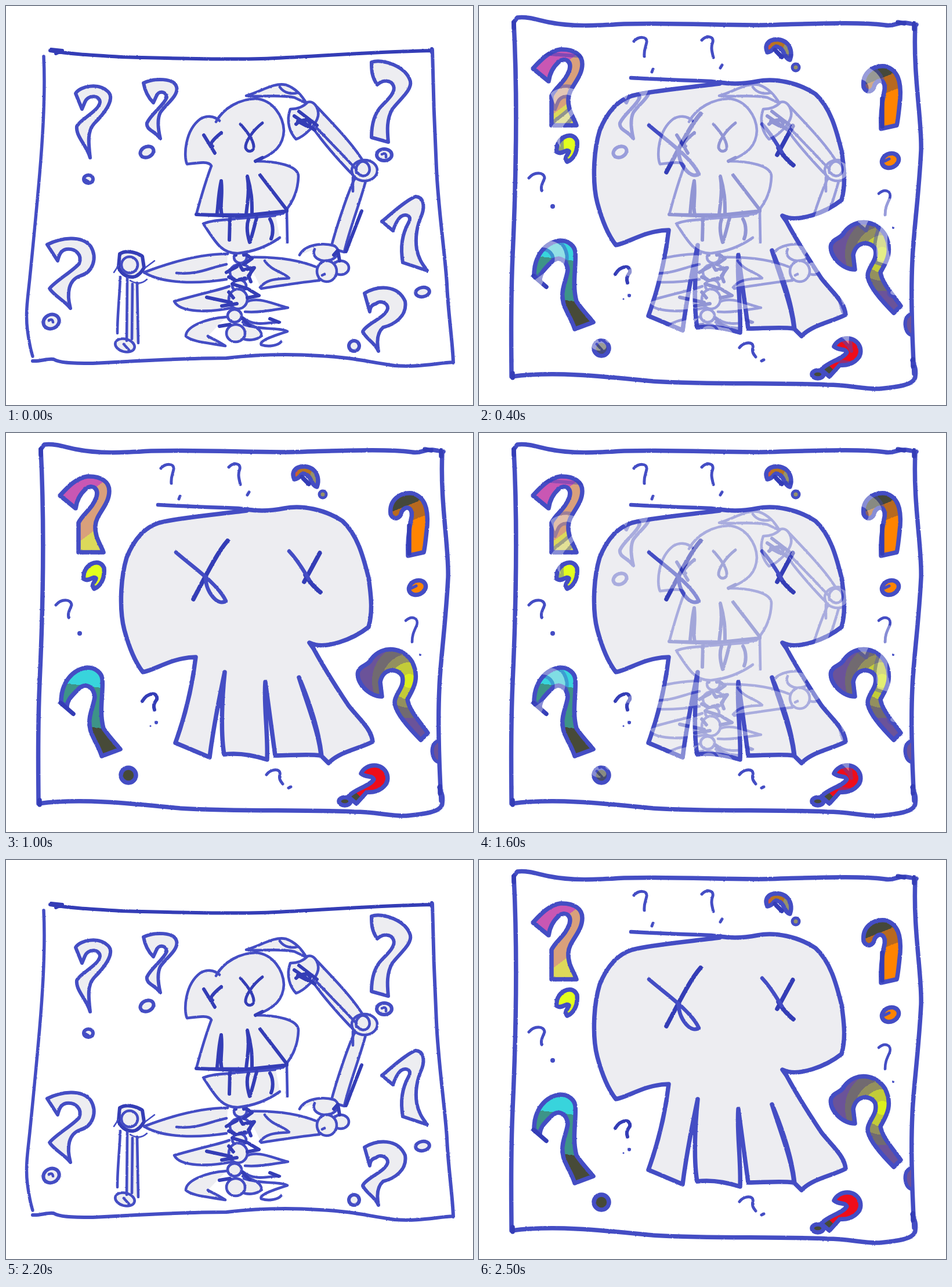
Write an HTML page without scripts that moves like this. It is 805 px wide and 689 px high and loops after 2.6 s.

```html
<!DOCTYPE html>
<html lang="en">
<head>
<meta charset="utf-8">
<title>Skull and skeleton</title>
<style>
html, body { margin: 0; width: 100%; height: 100%; overflow: hidden; background: #fff; }
svg { display: block; width: 100%; height: 100%; }
.ink { fill: none; stroke: #444dc4; stroke-width: 6; stroke-linecap: round; stroke-linejoin: round; }
.pale { fill: #ededf1; }
.dark { stroke: #343db6; }
.thin { stroke-width: 4.6; }
.bold { stroke-width: 7.5; }
.dot { fill: #444dc4; stroke: none; }
mask { mask-type: alpha; }

.bones, .skull, .skull-ghost, .bones-ghost { animation: 2600ms -10ms infinite; }
.bones { animation-name: bones; animation-timing-function: step-end; }
.skull { animation-name: skull; animation-timing-function: step-end; }
.skull-ghost { animation-name: skull-ghost; }
.bones-ghost { animation-name: bones-ghost; }

@keyframes bones {
  0%, 65.385%, 92.308% { opacity: 1; }
  15.385%, 88.462%, 96.154%, 100% { opacity: 0; }
}
@keyframes skull {
  0%, 65.385%, 92.308% { opacity: 0; }
  15.385%, 88.462%, 96.154%, 100% { opacity: 1; }
}
@keyframes skull-ghost {
  0% { opacity: 0; animation-timing-function: steps(8); }
  30.769% { opacity: 1; }
  46.154% { opacity: 1; animation-timing-function: steps(10); }
  84.615%, 100% { opacity: 0; }
}
@keyframes bones-ghost {
  0% { opacity: 1; animation-timing-function: steps(8); }
  30.769% { opacity: 0; }
  46.154% { opacity: 0; animation-timing-function: steps(10); }
  84.61% { opacity: 1; animation-timing-function: step-start; }
  84.62%, 100% { opacity: 0; }
}
</style>
</head>
<body>
<svg viewBox="0 0 805 689" preserveAspectRatio="none">
<defs>
  <filter id="rough" filterUnits="userSpaceOnUse" x="0" y="0" width="805" height="689" color-interpolation-filters="sRGB">
    <feTurbulence type="fractalNoise" baseFrequency=".25" numOctaves="2" seed="4"/>
    <feDisplacementMap in="SourceGraphic" scale="2" xChannelSelector="R" yChannelSelector="G"/>
  </filter>

  <linearGradient id="candy" gradientUnits="userSpaceOnUse" x1="60" y1="80" x2="180" y2="240">
    <stop offset=".34" stop-color="#c957b3"/><stop offset=".34" stop-color="#d9a07b"/>
    <stop offset=".63" stop-color="#d9a07b"/><stop offset=".63" stop-color="#dcd95a"/>
  </linearGradient>
  <linearGradient id="sea" gradientUnits="userSpaceOnUse" x1="130" y1="400" x2="110" y2="560">
    <stop offset=".22" stop-color="#38d4dc"/><stop offset=".22" stop-color="#3d9488"/>
    <stop offset=".65" stop-color="#3d9488"/><stop offset=".65" stop-color="#474a38"/>
  </linearGradient>
  <linearGradient id="amber" gradientUnits="userSpaceOnUse" x1="672" y1="110" x2="712" y2="210">
    <stop offset=".13" stop-color="#45483a"/><stop offset=".2" stop-color="#45483a"/>
    <stop offset=".2" stop-color="#b8691f"/><stop offset=".45" stop-color="#b8691f"/>
    <stop offset=".45" stop-color="#ff8400"/>
  </linearGradient>
  <linearGradient id="rust" gradientUnits="userSpaceOnUse" x1="496" y1="60" x2="540" y2="78">
    <stop offset=".2" stop-color="#d0583c"/><stop offset=".2" stop-color="#b8741f"/>
    <stop offset=".65" stop-color="#b8741f"/><stop offset=".65" stop-color="#96926a"/>
  </linearGradient>
  <linearGradient id="ember" gradientUnits="userSpaceOnUse" x1="590" y1="640" x2="640" y2="590">
    <stop offset=".33" stop-color="#474a38"/><stop offset=".33" stop-color="#ee0d1a"/>
  </linearGradient>
  <radialGradient id="plum" gradientUnits="userSpaceOnUse" cx="695" cy="428" r="80">
    <stop offset=".15" stop-color="#dcf01e"/><stop offset=".15" stop-color="#c3cc38"/>
    <stop offset=".4" stop-color="#c3cc38"/><stop offset=".4" stop-color="#93905e"/>
    <stop offset=".58" stop-color="#93905e"/><stop offset=".58" stop-color="#716a70"/>
    <stop offset=".8" stop-color="#716a70"/><stop offset=".8" stop-color="#6b5399"/>
  </radialGradient>

  <g id="a" class="ink" filter="url(#rough)">
    <!-- border -->
    <path stroke-width="5.5" d="M65 87C68 150 64 220 58 290S44 440 41 470S33 530 37 560S43 595 46 605"/>
    <path class="dark" d="M76 77C110 83 150 85 200 88C300 91 400 92 440 91C530 88 600 80 735 77M78 75L97 77L86 82M734 74V80"/>
    <path d="M735 76C736 130 738 200 742 280C745 350 757 430 760 480C762 530 770 580 771 616M46 613C60 614 72 608 82 610C92 616 110 617 150 617C220 613 330 608 380 608C430 602 480 600 540 604C600 607 620 614 670 621C710 624 740 617 771 615"/>

    <!-- question marks -->
    <g class="pale">
      <path d="M120 151C128 138 160 132 176 148C190 162 165 190 152 203C140 216 142 235 145 262C140 242 120 225 122 208C128 195 160 182 162 166C162 154 142 152 136 166L131 178Z"/>
      <path d="M237 133C255 124 290 124 294 140C298 155 275 170 266 184C260 196 262 212 266 229C256 215 241 214 243 202C250 186 272 172 277 158C276 146 262 146 259 156L254 167C247 160 240 150 237 133Z"/>
      <path d="M630 97C650 90 690 105 697 130C700 145 680 160 666 178C656 195 657 215 659 235L630 227C630 205 635 185 648 172C660 160 672 148 668 138C664 128 650 126 640 136C630 122 630 110 630 97Z"/>
      <path d="M648 372C665 358 690 335 706 329C720 330 722 345 717 360C708 380 705 400 708 420C712 440 720 448 726 457L684 443C680 420 682 395 694 374C700 362 690 358 680 364C672 372 670 380 667 388Z"/>
      <path d="M71 412C95 400 130 395 146 415C158 435 150 460 128 466C108 473 104 495 111 522C100 508 85 502 75 488C85 475 115 458 126 445C132 430 120 418 104 420C95 422 92 428 89 440Z"/>
      <path d="M618 496C640 483 675 480 688 510C692 535 670 550 650 555C642 562 638 575 642 596C635 580 620 575 615 562C622 548 655 538 658 522C658 512 645 508 638 514C630 516 628 520 627 528Z"/>
      <ellipse cx="142" cy="299" rx="8" ry="7"/>
      <ellipse cx="243" cy="252" rx="12" ry="9" transform="rotate(-25 243 252)"/>
      <ellipse cx="652" cy="257" rx="13" ry="10"/>
      <ellipse cx="718" cy="494" rx="12" ry="8" transform="rotate(-10 718 494)"/>
      <ellipse cx="78" cy="545" rx="14" ry="12" transform="rotate(-25 78 545)"/>
      <circle cx="600" cy="587" r="9"/>
    </g>
    <path class="thin" d="M648 256Q656 252 655 261M74 543Q80 539 81 546M137 300L142 303"/>

    <!-- arms -->
    <g class="pale thin">
      <path d="M414 155C440 148 460 132 482 136C500 142 510 155 518 168L497 158C470 152 440 158 414 155Z"/>
      <path d="M536 174C565 205 600 240 618 272L600 294C575 268 550 240 530 212Z"/>
      <path d="M490 178C482 200 490 220 500 230C515 225 535 205 538 190C540 175 530 163 520 166C512 175 500 178 490 178Z"/>
      <path d="M602 296C590 320 570 380 560 418L583 425C592 385 612 335 620 302"/>
      <ellipse cx="618" cy="284" rx="22" ry="18"/>
      <path d="M506 430C515 412 545 408 566 414C580 424 570 440 548 440C532 438 528 428 532 420"/>
      <ellipse cx="577" cy="452" rx="14" ry="12"/>
      <path d="M208 470L208 580L228 582L226 476Z" stroke="none"/>
      <path d="M382 428C340 428 290 440 238 460C270 480 330 480 380 472"/>
      <path d="M414 434C470 432 510 440 538 452L540 474C500 478 460 485 440 488"/>
      <ellipse cx="553" cy="458" rx="17" ry="18"/>
      <path class="dark" stroke-width="6" d="M196 428C208 420 225 426 235 432L238 452C232 462 226 468 218 468C206 468 196 460 194 450Z"/>
      <circle cx="213" cy="447" r="14"/>
      <ellipse cx="205" cy="586" rx="17" ry="11" transform="rotate(15 205 586)"/>
    </g>
    <path class="thin" d="M472 140C480 152 495 152 502 150M535 210L604 282M598 296L598 320M604 288C600 270 618 262 625 275C632 290 616 300 606 288M545 465L549 463M192 565C192 530 196 500 197 468M209 470L208 578M218 480L217 575M226 478L228 582M203 584L212 594M294 461C330 465 350 452 380 446M446 440C458 458 480 460 488 470C470 472 450 470 438 486"/>
    <path stroke-width="2.5" d="M186 460L194 448M240 452L256 440M214 474Q230 484 243 472"/>
    <path class="dark" d="M613 354L586 424M497 190L532 214M500 204C515 190 532 200 520 208L503 199M505 182L536 206M565 430L572 422L575 440"/>

    <!-- ribs and spine -->
    <g class="pale thin">
      <path d="M385 484C370 490 330 498 290 510C300 530 350 530 395 520"/>
      <path d="M412 512C435 500 460 515 486 521C460 525 435 530 412 528"/>
      <path d="M380 537C340 540 310 555 310 570C320 580 350 582 378 587C365 578 350 572 348 570"/>
      <path d="M408 546C430 552 442 560 440 570C430 578 415 578 408 574"/>
      <ellipse cx="404" cy="434" rx="11" ry="10"/>
      <ellipse cx="404" cy="460" rx="18" ry="14"/>
      <ellipse cx="402" cy="483" rx="12" ry="10"/>
      <ellipse cx="400" cy="506" rx="16" ry="17"/>
      <ellipse cx="394" cy="535" rx="12" ry="11"/>
      <ellipse cx="396" cy="565" rx="16" ry="15"/>
    </g>
    <path class="thin" d="M408 538C430 556 455 545 472 546M410 550C440 560 475 555 485 562C460 570 436 578 440 585C455 590 470 585 474 580"/>
    <path class="dark" d="M396 420V430M410 420V430M412 428L424 436L410 446M380 460C392 452 398 452 402 446L408 456L428 452L418 466L422 476M384 468L396 474L412 470M390 480L416 488L436 500L416 504M346 503L388 512M372 518L398 514M384 494L392 504M368 553L386 550M408 540L420 552M455 540L470 546"/>

    <!-- head -->
    <g class="pale">
      <path d="M340 374C360 405 370 428 400 427C430 424 455 412 472 400L465 362L400 366Z" stroke="none"/>
      <path class="thin" d="M362 200C375 175 405 160 432 160C460 163 478 190 479 215C478 240 465 255 430 268C465 268 505 275 504 295C503 325 490 345 478 358C450 364 420 360 400 360L328 360C336 330 347 295 354 276C350 268 335 270 312 273C306 260 308 215 335 195C345 189 358 189 368 198"/>
    </g>
    <path class="thin" d="M472 400C455 412 430 424 400 427C370 428 360 405 340 376C360 368 380 370 400 367L464 362M484 354L485 408"/>
    <path class="dark" d="M328 360L400 363L484 354M341 223L360 254M371 219C355 232 350 240 356 242M371 302C366 325 366 340 364 358M371 302C374 330 368 345 372 360M416 294C420 320 416 340 414 360M416 294C425 325 424 345 424 360M438 292L484 352M386 366L385 404M418 368C414 380 416 395 420 408C425 395 428 380 432 366M455 368C462 380 460 395 457 402M430 268L442 262"/>
    <path class="dark" stroke-width="5" d="M442 202C425 215 412 235 413 245C416 254 428 252 427 242C426 230 414 215 404 204"/>
  </g>

  <g id="b" class="ink bold" filter="url(#rough)">
    <!-- border -->
    <path d="M60 28L66 20C85 18 100 24 120 28C160 36 200 34 250 31C350 28 450 36 520 32C600 30 660 28 700 33C715 36 720 28 735 29L754 32"/>
    <path d="M60 28C66 150 64 300 58 430C54 520 56 600 56 640C130 630 220 640 300 648C400 654 500 650 600 654C640 654 660 662 690 661C720 658 750 655 752 640C754 625 750 620 747 612"/>
    <path d="M752 34C748 120 764 200 762 250C758 330 748 400 747 440C744 500 746 560 750 635"/>
    <path class="dark" d="M60 28V38M722 28L733 30M750 30V40M748 610V622M58 634V642"/>
    <path fill="#6b5399" stroke-width="6" d="M745 532C730 535 732 565 745 568"/>

    <!-- skull -->
    <path class="pale" d="M415 134C360 141 300 146 264 155C235 164 218 190 208 215C196 255 196 310 204 340C212 370 222 395 236 413C260 408 285 388 327 387C322 430 310 485 292 535L351 560C356 520 365 470 377 413C372 460 370 520 376 555C400 552 425 556 450 564C452 520 444 470 447 430C452 470 458 510 464 557C490 557 520 554 543 557C540 520 520 470 505 422C525 470 540 520 544 558L556 570C575 550 610 545 632 533C630 510 605 490 590 470C570 440 545 400 530 372L523 362C550 376 600 355 625 335C632 310 630 285 625 250C615 210 605 175 580 152C550 132 510 124 480 130C460 134 440 136 415 132"/>
    <path stroke-width="6.5" d="M262 124C300 126 340 128 400 130L425 133"/>
    <path class="dark" d="M382 186C365 205 345 245 323 287M541 207L514 257M516 245Q526 262 542 275"/>
    <path stroke-width="6.5" d="M293 206C320 230 365 260 379 290C365 300 345 275 344 250M488 204C505 222 514 240 522 252"/>

    <!-- coloured question marks -->
    <path fill="url(#candy)" d="M93 108C105 95 120 78 140 75C165 74 178 85 178 100C178 125 155 140 154 160C153 180 162 190 168 206L125 206L125 155C132 140 150 130 156 110C160 95 148 88 138 96C128 105 122 115 120 130Z"/>
    <path fill="#e2ff1e" d="M134 252C130 230 160 212 169 233C171 255 160 266 152 269C146 262 153 258 155 251C150 246 143 258 134 252Z"/>
    <path fill="url(#sea)" d="M95 465C95 430 115 408 140 405C155 405 165 415 166 425C168 450 160 480 168 510C178 525 188 535 197 546L165 558C160 540 145 520 145 510C140 490 152 470 153 455C150 435 135 432 125 442C112 455 105 462 105 474Z"/>
    <path class="dark" d="M94 466L116 485"/>
    <ellipse fill="#474a38" cx="211" cy="591" rx="13" ry="13"/>
    <path fill="url(#rust)" d="M497 80C488 60 512 52 528 62C538 70 540 82 536 93C524 90 528 72 512 70C506 72 508 78 497 80Z"/>
    <path class="dark" d="M510 76L522 88"/>
    <circle fill="#96926a" stroke-width="5" cx="546" cy="106" r="6"/>
    <path fill="url(#amber)" d="M663 140C660 115 680 102 700 104C722 110 728 130 726 160C724 180 722 200 720 206L693 212C692 190 694 170 698 150C704 130 690 122 682 136C680 148 668 152 663 140Z"/>
    <path class="dark" d="M695 160L695 208"/>
    <ellipse fill="#ff8400" cx="709" cy="267" rx="15" ry="12" transform="rotate(-25 709 267)"/>
    <path stroke-width="5" d="M699 268L707 264"/>
    <path fill="url(#plum)" d="M648 455C625 455 602 430 607 412C612 400 625 402 630 390C650 365 685 370 700 395C715 425 700 445 692 460C695 480 715 500 727 518L715 530C690 505 670 480 670 465C670 450 688 440 683 420C675 405 650 405 645 430Z"/>
    <path fill="url(#ember)" d="M612 588C620 570 650 568 657 590C662 610 640 622 622 620L604 640L590 628C600 615 628 610 634 598C630 590 622 596 612 588Z"/>
    <ellipse fill="#474a38" cx="584" cy="636" rx="10" ry="7"/>

    <!-- small question marks -->
    <g stroke-width="5">
      <path d="M267 61C275 52 290 52 289 62C288 70 284 75 285 87M384 59C392 50 405 52 403 62C399 72 402 80 404 89M86 297C95 286 112 286 113 297C110 306 106 310 108 319M449 590C455 580 475 578 472 590C470 598 474 602 477 606M300 109L298 114M419 102L416 107M487 613L491 611"/>
      <path class="thin" d="M689 324C700 314 712 320 708 332C702 345 700 350 700 361"/>
      <path class="dark" stroke-width="6" d="M235 463C245 447 262 447 260 460C254 468 254 472 256 478"/>
    </g>
    <g class="dot">
      <circle cx="127" cy="346" r="4"/><circle cx="714" cy="383" r="2"/>
      <circle cx="259" cy="500" r="3"/><circle cx="249" cy="506" r="1.5"/>
    </g>
  </g>

  <mask id="in-a" maskUnits="userSpaceOnUse" x="0" y="0" width="805" height="689"><use href="#a"/></mask>
  <mask id="in-b" maskUnits="userSpaceOnUse" x="0" y="0" width="805" height="689"><use href="#b"/></mask>
</defs>

<!-- each drawing lets the other show through only where it is inked or filled -->
<g class="bones">
  <use href="#a"/>
  <g mask="url(#in-a)"><use class="skull-ghost" href="#b"/></g>
</g>
<g class="skull">
  <use href="#b"/>
  <g mask="url(#in-b)"><use class="bones-ghost" href="#a"/></g>
</g>
</svg>
</body>
</html>
```
